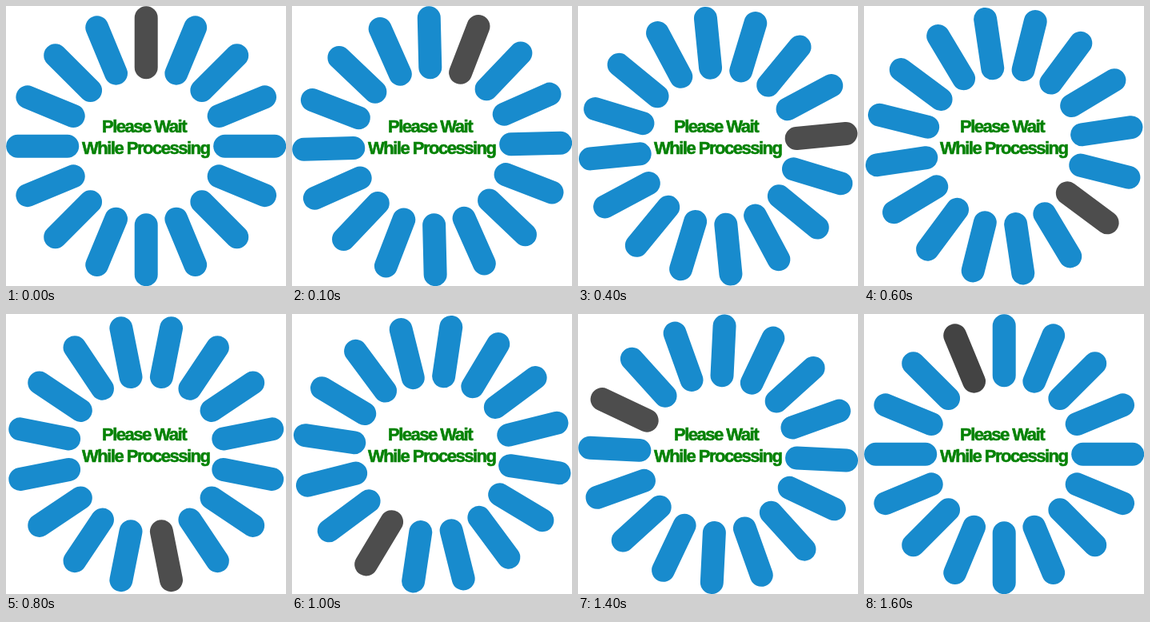
Write an HTML page that moves like this. It is 350x350 px and loops after 1.7 s.

```html
<!DOCTYPE html>
<html lang="en">
<head>
<meta charset="utf-8">
<title>Please wait</title>
<style>
  html, body { margin: 0; width: 100%; height: 100%; overflow: hidden; background: #fff; }
  svg { display: block; width: 100vw; height: 100vh; }
  line { stroke: #188bcd; stroke-width: 29; stroke-linecap: round; }
  text {
    font: bold 22px Impact, "Liberation Sans", Arial, sans-serif;
    letter-spacing: -1.5px;
    fill: #058205;
    stroke: #058205;
    stroke-width: .6;
  }
</style>
</head>
<body>
<svg viewBox="0 0 350 350">
  <g id="wheel"></g>
  <text x="120" y="157.5">Please Wait</text>
  <text x="95" y="184.5">While Processing</text>
</svg>
<script>
  const SPOKES = 16, STEPS = 17, STEP_MS = 100;
  const CENTER = 175.2, INNER = 98.5, OUTER = 160.5;
  const GAP = 360 / SPOKES;
  const wheel = document.getElementById('wheel');

  const spokes = Array.from({ length: SPOKES }, (_, i) => {
    const spoke = document.createElementNS('http://www.w3.org/2000/svg', 'line');
    spoke.setAttribute('y1', -INNER);
    spoke.setAttribute('y2', -OUTER);
    spoke.setAttribute('transform', `rotate(${i * GAP})`);
    return wheel.appendChild(spoke);
  });

  // The dark spoke leads; the ring turns so that 16 steps cover 15 gaps.
  function draw(now) {
    const step = Math.floor(now / STEP_MS) % STEPS;
    const angle = step * GAP * (SPOKES - 1) / SPOKES;
    wheel.setAttribute('transform', `translate(${CENTER} ${CENTER}) rotate(${angle})`);
    spokes[0].style.stroke = step === STEPS - 1 ? '#434343' : '#4d4d4d';
  }

  const start = performance.now();
  function tick() {
    draw(performance.now() - start);
    requestAnimationFrame(tick);
  }
  tick();
</script>
</body>
</html>
```
